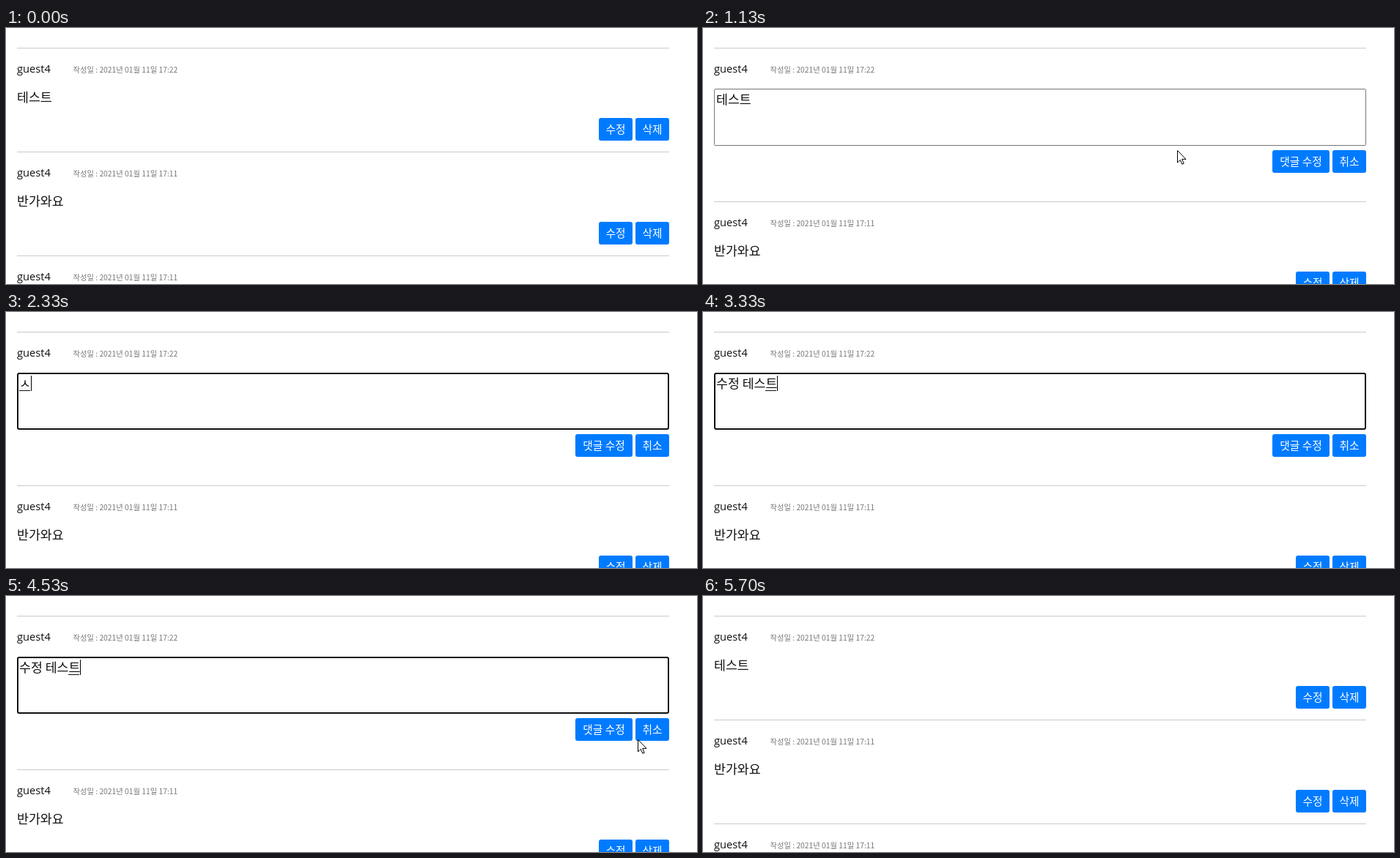
Recreate the animation shown at these times as an HTML page with a canvas. Size 943 by 350 pixels, loop 5.73 s.

```html
<!DOCTYPE html>
<html lang="ko">
<head>
<meta charset="utf-8">
<title>댓글 수정</title>
<style>
  html, body { margin: 0; width: 100%; height: 100%; overflow: hidden; background: #fff; }
  canvas { display: block; }
</style>
</head>
<body>
<canvas id="stage" width="943" height="350"></canvas>
<script>
const ctx = document.getElementById('stage').getContext('2d');
const LOOP = 5730;
const HANGUL = '"Noto Sans CJK KR", "Noto Sans CJK", sans-serif';
const BODY = '300 17.3px ' + HANGUL;
const LABEL = '14.7px ' + HANGUL;
const SMALL = '10.3px ' + HANGUL;
const NAME = '14.7px "Open Sans", "Noto Sans", sans-serif';
const INK = '#111';
const BOX = { x: 15, y: 83, w: 890, h: 78 };
const TEXT_X = 18, TEXT_Y = 104;
const EDIT = 800, FOCUS = 1400, DRAG = 1540, TYPE = 2330, LIST = 4930;
const OLD = '테스트';

// Bursts of evenly spaced keystrokes, each giving the text composed so far
const bursts = [
  { from: 2330, to: 2330, steps: ['ㅅ'] },
  { from: 2500, to: 3000, steps: ['수', '숮', '수저', '수정', '수정 ', '수정 ㅌ', '수정 테'] },
  { from: 3100, to: 3330, steps: ['수정 텟', '수정 테스', '수정 테슽', '수정 테스트'] }
];

// While the pointer shows, it rests between moves: [start, end, x, y, upward bend]
const visits = [
  { show: 170, hide: TYPE, x: 882, y: 214, moves: [
    [170, 430, 838, 137], [1000, 1130, 647, 167], [1130, 1400, 617, 150], [DRAG, 1870, 24, 97]
  ] },
  { show: 3830, hide: 5700, x: 59, y: 97, moves: [
    [3830, 4300, 860, 244, 162], [4300, 4400, 851, 205], [4400, 4700, 879, 183],
    [4900, 5070, 886, 187], [5640, 5670, 917, 187]
  ] }
];

const arrow = new Path2D('M.5 .5V17L4.3 13.4 6.8 19.2 9.2 18.2 6.7 12.4H12Z');
const hand = new Path2D(
  'M-1 1.5Q.5 -.7 2 1.5V7Q4 5.6 5 7.5Q7 6.6 8 8.5Q10.5 8 10.5 10.5V15' +
  'Q10.5 18 8.5 20V22.5H0V20L-5 14.5Q-6 11.5 -3.5 11.5L-1 13.5Z');
const knuckles = new Path2D('M2 7V11.5M5 7.5V11.5M8 8.5V11.5');

const clamp = (v, lo, hi) => Math.max(lo, Math.min(hi, v));
const smooth = k => k * k * (3 - 2 * k);

function pointerAt(t) {
  const visit = visits.find(v => t >= v.show && t < v.hide);
  if (!visit) return null;
  let { x, y } = visit;
  for (const [start, end, toX, toY, bend = 0] of visit.moves) {
    const k = smooth(clamp((t - start) / (end - start), 0, 1));
    x += (toX - x) * k;
    y += (toY - y) * k - bend * 4 * k * (1 - k);
  }
  return { x: Math.round(x), y: Math.round(y) };
}

function typedAt(t) {
  const { from, to, steps } = bursts.filter(b => b.from <= t).pop();
  const k = to > from ? clamp((t - from) / (to - from), 0, 1) : 1;
  return steps[Math.floor(k * (steps.length - 1))];
}

function inside(p, r, inset = 0) {
  return p && p.x >= r.x + inset && p.x < r.x + r.w - inset &&
    p.y >= r.y + inset && p.y < r.y + r.h - inset;
}

function rect(x, y, w, h, color) {
  ctx.fillStyle = color;
  ctx.fillRect(x, y, w, h);
}

function text(str, x, y, font, color = INK) {
  ctx.font = font;
  ctx.fillStyle = color;
  ctx.fillText(str, x, y);
}

function rounded(x, y, w, h, r) {
  ctx.beginPath();
  ctx.roundRect(x, y, w, h, r);
}

function widthOf(str) {
  ctx.font = BODY;
  return ctx.measureText(str).width;
}

// Returns true when the pointer is over the button
function button(label, x, y, w, p) {
  const over = inside(p, { x, y, w, h: 31 }, 3);
  rounded(x, y, w, 31, 3);
  ctx.fillStyle = over ? '#0069d9' : '#007bff';
  ctx.fill();
  ctx.textAlign = 'center';
  text(label, x + w / 2, y + 21, LABEL, '#fff');
  ctx.textAlign = 'left';
  return over;
}

function header(y, time) {
  rect(15, y, 890, 1, '#cacaca');
  text('guest4', 15, y + 34, NAME);
  text('작성일 : 2021년 01월 11일 ' + time, 91.5, y + 34, SMALL, '#777');
}

function comment(y, time, body, p) {
  header(y, time);
  text(body, 15, y + 74, BODY);
  const edit = button('수정', 809, y + 96, 46, p);
  const remove = button('삭제', 859, y + 96, 46, p);
  return edit || remove;
}

function caret(str) {
  rect(Math.round(TEXT_X + widthOf(str)), 87, 1, 21, '#000');
}

// The old text, selected backwards from its end as the pointer drags left
function oldText(t, p) {
  text(OLD, TEXT_X, TEXT_Y, BODY);
  if (t < FOCUS) return;
  const step = widthOf(OLD) / OLD.length;
  const from = clamp(Math.round((p.x - TEXT_X) / step), 0, OLD.length);
  if (from === OLD.length) return caret(OLD);
  const x = TEXT_X + from * step;
  rect(x, 87, (OLD.length - from) * step, 21, '#0078d7');
  text(OLD.slice(from), x, TEXT_Y, BODY, '#fff');
}

function newText(t) {
  const str = typedAt(t);
  text(str, TEXT_X, TEXT_Y, BODY);
  if (!str.endsWith(' ')) {
    const head = widthOf(str.slice(0, -1));
    rect(Math.round(TEXT_X + head), 107, Math.round(widthOf(str) - head) - 1, 1, INK);
  }
  const blinkOff = t >= 3830 && t < 4330;
  if (!blinkOff) caret(str);
}

function editor(t, p) {
  header(27, '17:22');
  const { x, y, w, h } = BOX;
  const focused = t >= FOCUS;
  const line = focused ? 2 : 1;
  ctx.lineWidth = line;
  ctx.strokeStyle = focused ? '#101010' : '#767676';
  rounded(x + line / 2, y + line / 2, w - line, h - line, line);
  ctx.stroke();
  if (t < TYPE) oldText(t, p);
  else newText(t);
  const save = button('댓글 수정', 777, 167, 78, p);
  const cancel = button('취소', 859, 167, 46, p);
  return save || cancel;
}

function outline(shape) {
  ctx.lineWidth = 1;
  ctx.lineJoin = 'round';
  ctx.fillStyle = '#fff';
  ctx.strokeStyle = '#000';
  ctx.fill(shape);
  ctx.stroke(shape);
}

function drawPointer(p, kind) {
  ctx.save();
  ctx.translate(p.x, p.y);
  if (kind === 'beam') {
    rect(0, -8, 1, 17, '#000');
    for (const y of [-9, 9]) {
      rect(-3, y, 3, 1, '#000');
      rect(1, y, 3, 1, '#000');
    }
  } else if (kind === 'hand') {
    ctx.translate(-0.5, -0.5);
    outline(hand);
    ctx.stroke(knuckles);
  } else {
    outline(arrow);
  }
  ctx.restore();
}

function draw(t) {
  const p = pointerAt(t);
  const editing = t >= EDIT && t < LIST;
  rect(0, 0, 943, 350, '#fff');
  let over;
  if (editing) {
    over = editor(t, p);
    comment(237, '17:11', '반가와요', p);
  } else {
    over = comment(27, '17:22', OLD, p);
    comment(169, '17:11', '반가와요', p);
    header(311, '17:11');
  }
  if (!p) return;
  drawPointer(p, over ? 'hand' : editing && inside(p, BOX) ? 'beam' : 'arrow');
}

// The picture steps 30 times a second, timed to 10 ms
function tick() {
  const n = Math.floor((performance.now() % LOOP + 5) * 0.03);
  draw(Math.round(n * 10 / 3) * 10);
  requestAnimationFrame(tick);
}
tick();
</script>
</body>
</html>
```
